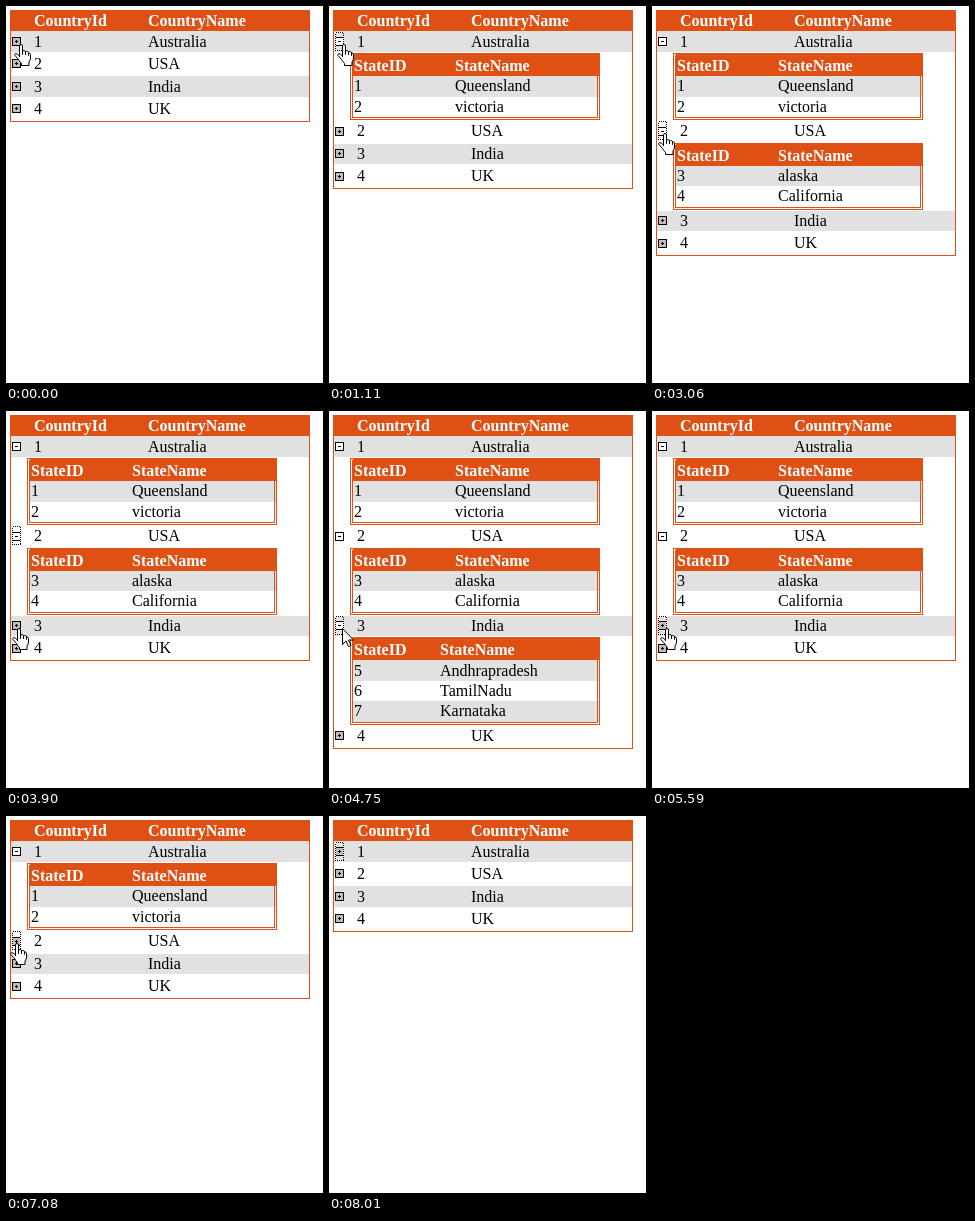
An HTML page that plays this animation: 317x377 px, repeating every 8370 ms.

```html
<!DOCTYPE html>
<html lang="en">
<head>
<meta charset="utf-8">
<title>Nested grid</title>
<style>
html, body { margin: 0; width: 100%; height: 100%; overflow: hidden; background: #fff; }
svg { display: block; width: 317px; height: 377px; }
text { font: 16px "Liberation Serif", "Times New Roman", serif; fill: #000; }
text.head { font-weight: bold; fill: #fff; }
</style>
</head>
<body>
<svg viewBox="0 0 317 377">
  <g id="grid" shape-rendering="crispEdges"></g>
  <path id="hand" fill="#fff" stroke="#000" stroke-linejoin="round" d="M5.5 13V2Q5.5 .5 7 .5Q8.5 .5 8.5 2V10.5V7.5Q9 6.4 10.2 6.6Q11.5 6.8 11.5 8V11V8Q12.3 7.2 13.4 7.5Q14.5 7.8 14.5 9V11.5V9Q16.5 8.7 16.5 10.5V14Q16.5 16 15 18V21.5H7.5V19.5Q5.5 17.5 4.5 15.5L1 11.5Q.3 10 1.5 9.6Q3 9.3 5.5 12"/>
  <path id="arrow" fill="#fff" stroke="#000" d="M.5 .5V16.5L4 13L6.5 18.5L9 17.5L6.5 12H11.5Z"/>
</svg>
<script>
const LOOP = 8370, TURN = 5310, REST = 300;
const ORANGE = '#df5015', GRAY = '#e1e1e1';
const TOP = 25, ROW = 22.5, LINE = 20.36;
const grid = document.getElementById('grid');
const hand = document.getElementById('hand');
const arrow = document.getElementById('arrow');

const countries = [
  { name: 'Australia', col: 126, states: ['Queensland', 'victoria'] },
  { name: 'USA', col: 126, states: ['alaska', 'California'] },
  { name: 'India', col: 111, states: ['Andhrapradesh', 'TamilNadu', 'Karnataka'] },
  { name: 'UK', states: [] }
];

// Rows open one by one, then close in reverse order.
const clicks = [
  { at: 1080, row: 0, x: 14, opens: true },
  { at: 2770, row: 1, x: 12, opens: true },
  { at: 4180, row: 2, x: 12, opens: true },
  { at: TURN, row: 2, x: 14 },
  { at: 6790, row: 1, x: 10 },
  { at: 7680, row: 0, x: 13 }
];

const nestHeight = c => 6 + LINE * (c.states.length + 1);
const clickY = c => TOP + 12.5 + c.row * (ROW + nestHeight(countries[0]));

// The picture refreshes in even steps, a little slower while closing.
function snap(t) {
  const step = t < TURN ? 282 : 297;
  return TURN + Math.floor((t - TURN) / step) * step;
}

function pageAt(t) {
  const page = { open: 0, focus: -1 };
  for (const c of clicks) {
    if (t >= c.at) page.open = c.opens ? c.row + 1 : c.row;
    if (t >= c.at - (c.opens ? 0 : REST)) page.focus = c.row;
  }
  return page;
}

// Rests as a hand around each click and travels as an arrow in between.
function pointerAt(t) {
  const last = clicks[clicks.length - 1];
  const next = clicks.find(c => c.at > t) || last;
  const prev = clicks[clicks.indexOf(next) - 1] || next;
  const from = prev.at + REST, to = next.at - REST;
  const still = prev === next || t >= last.at;
  const u = still ? 1 : Math.min(1, Math.max(0, (t - from) / (to - from)));
  const e = u * u * (3 - 2 * u), y0 = clickY(prev);
  return {
    x: Math.round(prev.x + (next.x - prev.x) * e),
    y: Math.round(y0 + (clickY(next) - y0) * e),
    isHand: u === 0 || u === 1,
    shown: t < last.at + REST
  };
}

const rect = (x, y, w, h, fill) =>
  `<rect x="${x}" y="${y}" width="${w}" height="${h}" fill="${fill}"/>`;
const frame = (x, y, w, h, color = ORANGE, extra = '') =>
  `<rect x="${x + .5}" y="${y + .5}" width="${w - 1}" height="${h - 1}" fill="none" stroke="${color}" ${extra}/>`;
const text = (x, y, str, cls = '') => `<text x="${x}" y="${y}" class="${cls}">${str}</text>`;

function icon(y, open) {
  return rect(6, y, 9, 9, '#000') + rect(7, y + 1, 7, 7, open ? '#fff' : '#c4b9be') +
    rect(9, y + 4, 3, 1, '#000') + (open ? '' : rect(10, y + 3, 1, 3, '#000'));
}

const focusBox = y =>
  frame(6, y, 9, 19, '#fff') + frame(6, y, 9, 19, '#000', 'stroke-dasharray="1 1"');

function nested(country, y, firstId) {
  const top = Math.floor(y), h = Math.floor(y + nestHeight(country)) - top;
  const band = r => Math.floor(y + 2.9 + LINE * r);
  const base = r => Math.floor(y + 18 + LINE * r);
  const line = (r, id, name, cls) => text(25, base(r), id, cls) + text(country.col, base(r), name, cls);
  let out = rect(21, top, 250, h, '#fff') + rect(24, top, 246, band(1) - top, ORANGE) +
    line(0, 'StateID', 'StateName', 'head');
  country.states.forEach((name, i) => {
    const r = i + 1;
    if (i % 2 === 0) out += rect(24, band(r), 246, band(r + 1) - band(r), GRAY);
    out += line(r, firstId + i, name);
  });
  return out + frame(21, top, 250, h) + frame(23, top + 2, 246, h - 4);
}

function drawGrid({ open, focus }) {
  let y = TOP, id = 1;
  let out = rect(4, 4, 300, 21, ORANGE) +
    text(28, 20, 'CountryId', 'head') + text(142, 20, 'CountryName', 'head');
  countries.forEach((c, i) => {
    const top = Math.floor(y), grayTop = Math.ceil(y);
    if (i % 2 === 0) out += rect(5, grayTop, 298, top + 21 - grayTop, GRAY);
    out += icon(Math.floor(y + 6.45), i < open);
    if (i === focus) out += focusBox(top + 1);
    out += text(28, top + 16, i + 1) + text(142, top + 16, c.name);
    y += ROW;
    if (i < open) {
      out += nested(c, y, id);
      y += nestHeight(c);
    }
    id += c.states.length;
  });
  grid.innerHTML = out + frame(4, 4, 300, Math.round(y) - 3);
}

function place(el, visible, x, y) {
  el.style.display = visible ? '' : 'none';
  el.setAttribute('transform', `translate(${x} ${y})`);
}

function draw(time) {
  const t = snap(time), p = pointerAt(t);
  drawGrid(pageAt(t));
  place(hand, p.shown && p.isHand, p.x - 6, p.y);
  place(arrow, p.shown && !p.isHand, p.x, p.y);
}

const start = performance.now();
function tick(now) {
  draw(Math.max(0, now - start) % LOOP);
  requestAnimationFrame(tick);
}
draw(0);
requestAnimationFrame(tick);
</script>
</body>
</html>
```
